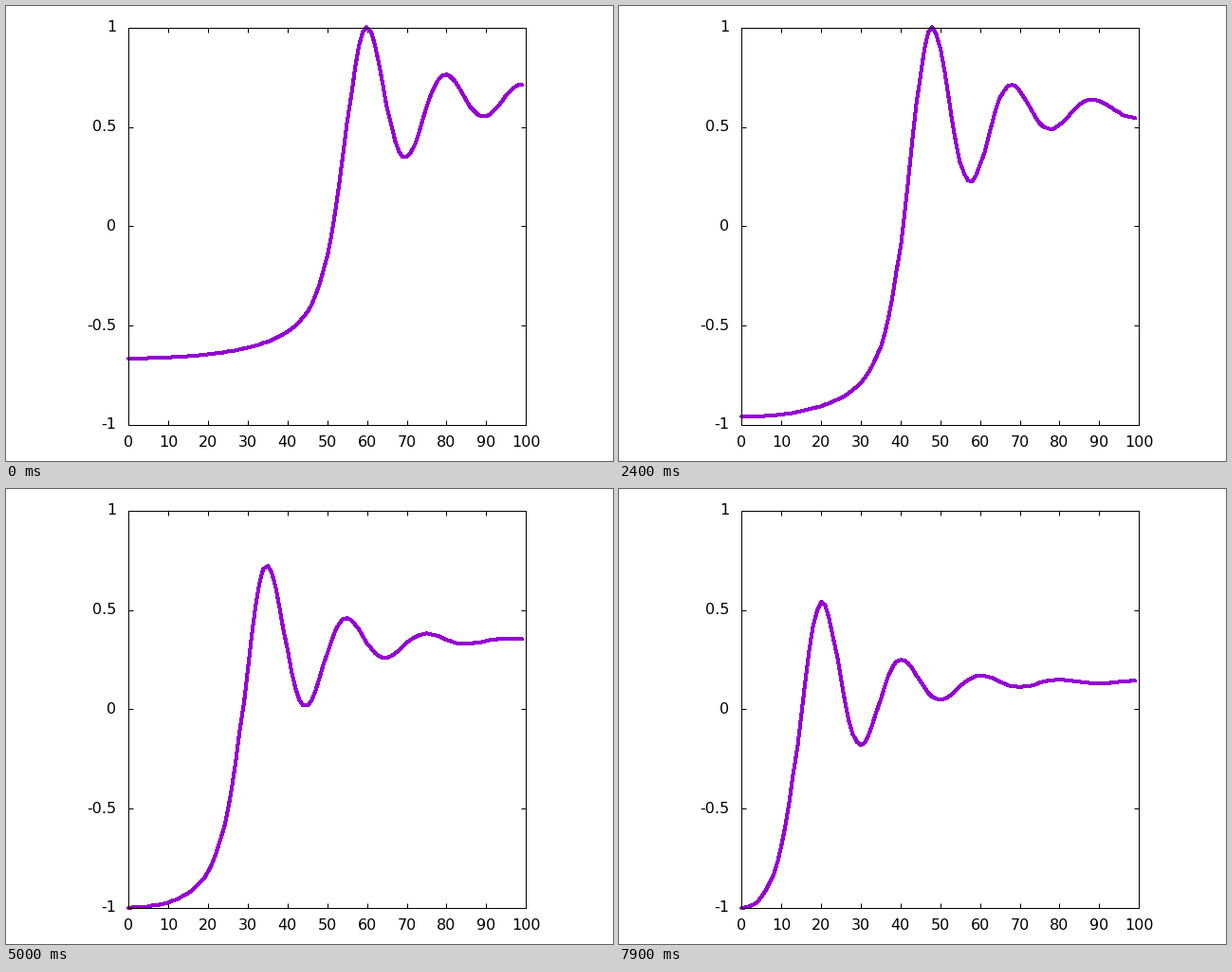
These frames come from a looping animation (640 px wide and 480 px high, 8000 ms). A matplotlib script:

```python
import numpy as np
import matplotlib.pyplot as plt
from matplotlib.animation import FuncAnimation

W, H, DPI = 640, 480, 80
PX = 72 / DPI                      # points per pixel
LEFT, RIGHT, TOP, BOTTOM = 129.25, 548.25, 22.75, 441.75
FRAMES, INTERVAL = 80, 100
START, SPEED = 59.9, 0.502         # first crest position, cells per frame
BASE = -2.065                      # level far ahead of the front

plt.rcParams["font.family"] = "DejaVu Sans"


def ripple(x):
    """Damped wake behind the crest."""
    return np.exp(-0.0635 * x) * (0.715 * np.cos(np.pi * x / 10 - 0.15) - 0.195)


def foot(d):
    return 0.87 * np.exp(-0.068 * np.hypot(d, 4))


def rise(d):
    """Steep face ahead of the crest, fading into a long foot."""
    height = ripple(0) - BASE - foot(0)
    return BASE + foot(d) + height / np.cosh(d / 10.6) ** 4


def front(x):
    return np.where(x < 0, rise(np.maximum(-x, 0)), ripple(np.maximum(x, 0)))


cells = np.arange(100)


def field(i):
    """Front moving left, mirrored at both walls; zero mean, unit peak."""
    c = START - SPEED * i
    u = front(cells - c) + front(-cells - c) + front(198 - cells - c)
    u -= u.mean()
    return u / np.abs(u).max()


def to_pixels(v, scale):
    return np.round(v * scale) / scale


fig = plt.figure(figsize=(W / DPI, H / DPI), dpi=DPI, facecolor="white")
ax = fig.add_axes([LEFT / W, 1 - BOTTOM / H, (RIGHT - LEFT) / W, (BOTTOM - TOP) / H])
ax.set(xlim=(0, 100), ylim=(-1, 1),
       xticks=range(0, 101, 10), yticks=np.arange(-1, 1.1, 0.5))
ax.tick_params(direction="in", top=True, right=True, length=5 * PX, width=PX,
               labelbottom=False, labelleft=False)
for spine in ax.spines.values():
    spine.set_linewidth(PX)


def label(x, y, text, ha):
    fig.text(x / W, 1 - y / H, text, ha=ha, va="baseline", fontsize=16 * PX)


for v in range(0, 101, 10):
    label(LEFT + (RIGHT - LEFT) * v / 100, 465, str(v), "center")
for v in np.arange(-1, 1.1, 0.5):
    label(116, BOTTOM - (BOTTOM - TOP) * (v + 1) / 2 + 4.5, f"{v:g}", "right")

XSCALE, YSCALE = (RIGHT - LEFT) / 100, (BOTTOM - TOP) / 2
curve, = ax.plot(to_pixels(cells, XSCALE), np.zeros(100), color="#9400d3",
                 lw=3 * PX, clip_on=False, antialiased=False,
                 solid_capstyle="round", solid_joinstyle="round")


def draw(i):
    curve.set_ydata(to_pixels(field(i), YSCALE))
    return curve,


anim = FuncAnimation(fig, draw, frames=FRAMES, interval=INTERVAL,
                     repeat=True, repeat_delay=0)
plt.show()
```
